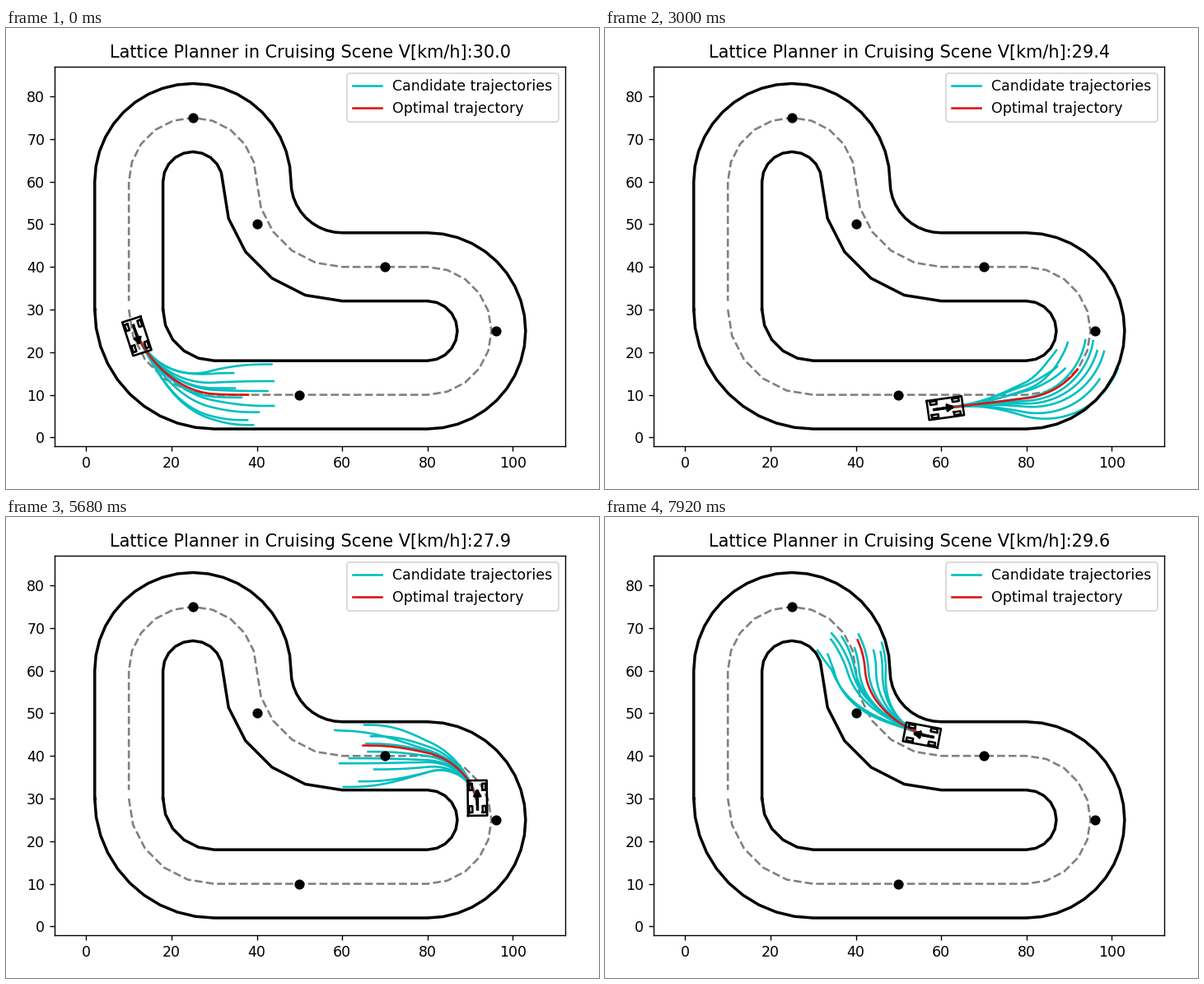
These frames come from a looping animation (720 px wide and 560 px high, 8000 ms). A matplotlib script:

```python
import numpy as np
import matplotlib.pyplot as plt
from matplotlib.animation import FuncAnimation

W, H, DPI = 720, 560, 125
FRAMES, TICK = 200, 40
LEFT, TOP, RIGHT, BOTTOM = 59.3, 46.5, 679.3, 508.0   # axes edges in pixels
HELD = {1, 4, 7, 11, 16}      # ticks of each 18 that repeat the previous picture
RAYS = 10

# Key points: tick, distance along the lane, lateral offset and slope,
# offset the best path aims for, speed in km/h
TICKS, DIST, OFFSET, SLOPE, GOAL, SPEED = np.array([
    (0, 3.9, 0.7, 0.115, 0, 30.0),
    (26, 22.7, -0.1, 0, -5, 28.1),
    (48, 39.5, -2.96, -0.167, -4, 28.3),
    (75, 59.8, -3.47, 0.14, 0, 29.4),
    (122, 93.6, 3.05, 0.178, 0, 27.9),
    (161, 123.4, -0.98, -0.333, -5, 27.9),
    (198, 151.0, -4.3, -0.048, -2, 29.6),
]).T


# ---- track ----
def arc(cx, cy, r, a, b, step):
    t = np.radians(np.linspace(a, b, round(abs(b - a) / step) + 1))
    return np.c_[cx + r * np.cos(t), cy + r * np.sin(t)]


def track(d, step=18, end=30):
    """Polyline running d to the left of the centre line."""
    return np.vstack([
        arc(30, 30, 20 - d, 180, 270, step),
        arc(80, 25, 15 - d, -90, 90, step),
        arc(60, 60, 20 + d, 270, 180, step),
        arc(25, 60, 15 - d, 0, 180, step),
        [(10 + d, end)],
    ]).T


# Smooth centre line, sampled by arc length
STEP = 0.05
KNOTS = np.cumsum([0, 10 * np.pi, 50, 15 * np.pi, 20, 10 * np.pi, 15 * np.pi, 30])
TURNS = np.radians([-90, 0, 0, 180, 180, 90, 270, 270])
S = np.arange(0, KNOTS[-1], STEP)
HEAD = np.interp(S, KNOTS, TURNS)
MID = np.interp(S + STEP / 2, KNOTS, TURNS)
CX = 10 + STEP * np.r_[0, np.cumsum(np.cos(MID))[:-1]]
CY = 30 + STEP * np.r_[0, np.cumsum(np.sin(MID))[:-1]]
BEND = np.gradient(HEAD, S)


def to_xy(s, d):
    h = np.interp(s, S, HEAD)
    return np.interp(s, S, CX) - d * np.sin(h), np.interp(s, S, CY) + d * np.cos(h)


# ---- motion ----
def lane(tick):
    """Distance, offset and slope: cubic Hermite between the key points."""
    s = np.interp(tick, TICKS, DIST)
    i = min(np.searchsorted(DIST, s, side="right"), len(DIST) - 1) - 1
    span = DIST[i + 1] - DIST[i]
    u = (s - DIST[i]) / span
    rise = OFFSET[i + 1] - OFFSET[i]
    m, n = SLOPE[i] * span, SLOPE[i + 1] * span
    d = OFFSET[i] + rise * u * u * (3 - 2 * u) + m * u * (1 - u) ** 2 - n * u * u * (1 - u)
    slope = 6 * rise * u * (1 - u) + m * (1 - u) * (1 - 3 * u) + n * u * (3 * u - 2)
    return s, d, slope / span


def pose(s, d, slope):
    turn = np.arctan2(slope, 1 - np.interp(s, S, BEND) * d)
    return *to_xy(s, d), np.interp(s, S, HEAD) + turn


U = np.linspace(0, 1, 45)
V = U**1.15
EASE = V**3 * (10 - 15 * V + 6 * V**2)
LEAD = U - 6 * U**3 + 8 * U**4 - 3 * U**5


def path(start, length, end):
    s, d, slope = start
    return to_xy(s + length * U, d + (end - d) * EASE + slope * length * LEAD)


def fan(tick):
    """Sampled lengths and end offsets, spread over the road width."""
    rng = np.random.default_rng(int(tick))
    ends = np.linspace(7, -7.6, RAYS) + rng.uniform(-0.6, 0.6, RAYS)
    return zip(rng.uniform(32, 43, RAYS), ends)


# ---- car ----
REAR, FRONT, WIDE, BASE, TREAD = 1.5, 6.75, 4.5, 5.25, 3.15
GAP = [(np.nan, np.nan)]


def rect(x0, x1, y0, y1):
    return [(x0, y1), (x0, y0), (x1, y0), (x1, y1), (x0, y1)] + GAP


BODY = rect(-REAR, FRONT, -WIDE / 2, WIDE / 2)
for wx in (0, BASE):
    for wy in (-TREAD / 2, TREAD / 2):
        BODY += rect(wx - 0.75, wx + 0.75, wy - 0.375, wy + 0.375)
TIP = 0.8 * BASE
BARB = 0.3 * TIP * np.array([np.cos(np.pi / 6), np.sin(np.pi / 6)])
ARROW = [(0, 0), (TIP, 0)] + GAP
for side in (-1, 1):
    ARROW += [(TIP, 0), (TIP - BARB[0], side * BARB[1])] + GAP
BODY, ARROW = np.array(BODY).T, np.array(ARROW).T


def place(shape, x, y, yaw):
    c, s = np.cos(yaw), np.sin(yaw)
    return x + c * shape[0] - s * shape[1], y + s * shape[0] + c * shape[1]


# ---- figure ----
plt.rcParams["font.family"] = "DejaVu Sans"
fig = plt.figure(figsize=(W / DPI, H / DPI), dpi=DPI, facecolor="white")
ax = fig.add_axes([LEFT / W, 1 - BOTTOM / H, (RIGHT - LEFT) / W, (BOTTOM - TOP) / H])
ax.set_xticks(range(0, 101, 20))
ax.set_yticks(range(0, 81, 10))

ax.plot(*track(0, end=32), "--", color="gray", zorder=1)
rays = [ax.plot([], [], "c", zorder=2)[0] for _ in range(RAYS)]
best, = ax.plot([], [], color="#dc1414", zorder=3)
ax.plot(*track(8), "k", lw=2, zorder=4)
ax.plot(*track(-8, step=9), "k", lw=2, zorder=4)
ax.plot([50, 96, 70, 40, 25], [10, 25, 40, 50, 75], "ko", zorder=5)
body, = ax.plot([], [], "k", zorder=6)
arrow, = ax.plot([], [], "k", lw=2, zorder=6)
title = ax.set_title("")

rays[0].set_label("Candidate trajectories")
best.set_label("Optimal trajectory")
ax.legend(loc="upper right").set_zorder(8)


def fit(low):
    """Equal-scale limits with a 5% margin around the content."""
    span = 83 - low
    half = 0.55 * span * (RIGHT - LEFT) / (BOTTOM - TOP)
    ax.set_ylim(low - 0.05 * span, 83 + 0.05 * span)
    ax.set_xlim(52.5 - half, 52.5 + half)


def update(k):
    tick = k - (k % 18 in HELD)
    start = lane(tick)
    car = pose(*start)
    low = 2
    for ray, (length, end) in zip(rays, fan(tick)):
        x, y = path(start, length, end)
        ray.set_data(x, y)
        low = min(low, y.min())
    best.set_data(*path(start, 35.5, np.interp(tick, TICKS, GOAL)))
    body.set_data(*place(BODY, *car))
    arrow.set_data(*place(ARROW, *car))
    speed = np.interp(tick, TICKS, SPEED)
    title.set_text(f"Lattice Planner in Cruising Scene V[km/h]:{speed:.1f}")
    fit(low)
    return []


anim = FuncAnimation(fig, update, frames=FRAMES, interval=TICK,
                     init_func=lambda: update(0), repeat=True, repeat_delay=0)
plt.show()
```
